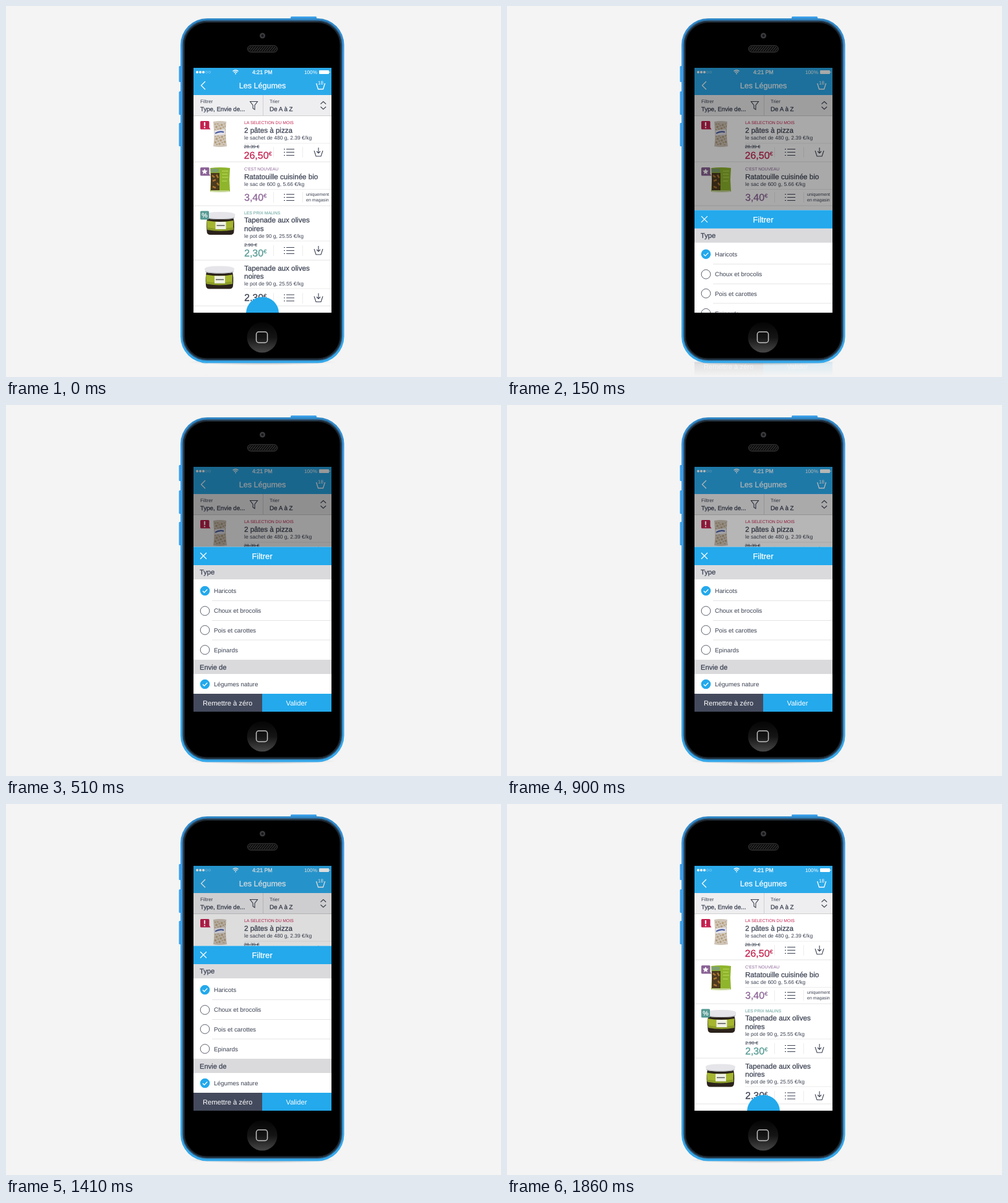
Recreate the animation shown at these times as an HTML page. Size 800 by 600 pixels, loop 2930 ms.

```html
<!DOCTYPE html>
<html lang="fr">
<head>
<meta charset="utf-8">
<title>Les Légumes</title>
<style>
html, body { margin: 0; width: 100%; height: 100%; overflow: hidden; background: #f4f4f4; }
svg { display: block; }
text { font: 10px "Liberation Sans", Arial, sans-serif; fill: currentColor; color: #3b4152; text-rendering: geometricPrecision; }
text.mid { stroke: currentColor; stroke-width: .25px; }
text.light { color: #fff; }
text.center { text-anchor: middle; }
text.tag { font-size: 6.85px; }
text.name { font-size: 11.6px; }
text.info { font-size: 8.5px; }
text.old { font-size: 7.5px; text-decoration: line-through .6px; }
text.price { font-size: 16px; }
text.price tspan { font-size: 9px; }
text.small { font-size: 7.1px; }
text.head { font-size: 11.2px; }
text.item { font-size: 9.9px; }
text.red { color: #c4214f; }
text.violet { color: #8b6396; }
text.green { color: #559a93; }
.line { fill: none; stroke: #3b4152; stroke-width: 1.1; }
.white { fill: none; stroke: #fff; stroke-width: 1.3; }
.rule { fill: none; stroke: #e4e4e6; stroke-width: 1; }

.slide { animation: slide 2930ms linear infinite; }
.fade { animation: fade 2930ms linear infinite; }
.dim { animation: dim 2930ms linear infinite; }
@keyframes slide {
  0% { transform: translateY(272px); }
  8.19%, 100% { transform: translateY(0); }
}
@keyframes fade {
  0%, 55.29% { opacity: 1; }
  63.48%, 100% { opacity: 0; }
}
@keyframes dim {
  0% { opacity: 0; }
  6.14%, 17.41% { opacity: .4; }
  63.48%, 100% { opacity: 0; }
}
</style>
</head>
<body>
<svg width="800" height="600" viewBox="0 0 800 600">
<defs>
  <clipPath id="screen"><path d="M303 100h223v396h-223z"/></clipPath>
  <linearGradient id="below" x1="0" y1="576" x2="0" y2="599" gradientUnits="userSpaceOnUse">
    <stop offset="0" stop-color="#fff" stop-opacity=".13"/>
    <stop offset="1" stop-color="#fff" stop-opacity="0"/>
  </linearGradient>
  <mask id="reflection" maskUnits="userSpaceOnUse" x="303" y="576" width="223" height="24">
    <path d="M303 576h223v24h-223z" fill="url(#below)"/>
  </mask>
  <linearGradient id="body" x1="0" x2="0" y1="0" y2="1">
    <stop offset="0" stop-color="#2f87c6"/>
    <stop offset=".1" stop-color="#3a9ae8"/>
    <stop offset="1" stop-color="#35a8ea"/>
  </linearGradient>
  <linearGradient id="button" x1="0" x2="0" y1="0" y2="1">
    <stop offset="0" stop-color="#050505"/>
    <stop offset=".5" stop-color="#141414"/>
    <stop offset="1" stop-color="#474747"/>
  </linearGradient>
  <radialGradient id="shadow">
    <stop offset="0" stop-opacity=".28"/>
    <stop offset="1" stop-opacity="0"/>
  </radialGradient>
  <pattern id="mesh" width="3" height="3" patternUnits="userSpaceOnUse" patternTransform="rotate(40)">
    <path d="M0 0h1v3h-1z" fill="#3c3c3c"/>
  </pattern>
  <pattern id="grain" width="7" height="6" patternUnits="userSpaceOnUse" patternTransform="rotate(20)">
    <path d="M0 0h3v3h-3zM4 3h2v2h-2z" fill="#a98d62"/>
  </pattern>

  <g id="list" class="line">
    <path d="M5 1h13M5 6h13M5 11h13M1 1h2M1 6h2M1 11h2"/>
  </g>
  <g id="basket" class="line">
    <path d="M1 5l3 9h8l3-9M8 0v9M5 6l3 3 3-3"/>
  </g>
  <g id="jar">
    <path d="M3 10q-2 6-1 21 0 6 6 6h32q6 0 6-6 1-15-1-21z" fill="#2b221b"/>
    <path d="M2 14q22 4 43 0l-.5 14q-20 3-42 0z" fill="#a5b52f"/>
    <path d="M2 25q20 4 43 0v4q-21 4-42 0z" fill="#8c9d28"/>
    <path d="M16 16h17v12h-17z" fill="#f1f2e6"/>
    <path d="M18 22h13" stroke="#555" stroke-width="1.5"/>
    <path d="M0 5q0-5 24-5t24 5l-1 4q-2 3-23 3t-23-3z" fill="#e6e6ea"/>
    <path d="M1 8q4 3 23 3t23-3l-1 2q-4 2-22 2t-22-2z" fill="#b4b6bc"/>
  </g>
  <g id="checked">
    <circle r="7.8" fill="#23a9ec"/>
    <path class="white" d="M-3.6 .2l2.6 2.6 4.8-5"/>
  </g>
  <circle id="unchecked" r="7.4" fill="#fff" stroke="#575c69"/>
  <path id="badge" d="M1.5 0h11.5q1.5 0 1.5 1.5v9l2 3h-15q-1.5 0-1.5-1.5v-10.500q0-1.500 1.500-1.500z"/>

  <g id="panel">
    <path d="M303 229.5h223v267h-223z" fill="#fff"/>
    <path d="M303 229.5h223v30h-223z" fill="#23a9ec"/>
    <path class="white" d="M314 239l10 10M324 239l-10 10"/>
    <text class="mid light center" x="414" y="249" style="font-size:13px">Filtrer</text>
    <path d="M303 259h223v23h-223zM303 412h223v23h-223z" fill="#dadadd"/>
    <text class="mid head" x="313" y="274">Type</text>
    <text class="mid head" x="313" y="427.5">Envie de</text>
    <path class="rule" d="M333 316.5h193M333 348.5h193M333 380h193"/>
    <use href="#checked" x="321.5" y="300.5"/>
    <use href="#unchecked" x="321.5" y="333"/>
    <use href="#unchecked" x="321.5" y="364"/>
    <use href="#unchecked" x="321.5" y="396"/>
    <use href="#checked" x="321.5" y="451.5"/>
    <text class="item" x="336" y="304">Haricots</text>
    <text class="item" x="336" y="336">Choux et brocolis</text>
    <text class="item" x="336" y="368">Pois et carottes</text>
    <text class="item" x="336" y="400">Epinards</text>
    <text class="item" x="336" y="455">Légumes nature</text>
    <path d="M303 467h111v29.5h-111z" fill="#444a5d"/>
    <path d="M414 467h112v29.5h-112z" fill="#23a9ec"/>
    <text class="light head center" x="358" y="486">Remettre à zéro</text>
    <text class="light head center" x="469.5" y="486">Valider</text>
  </g>
</defs>

<rect width="800" height="600" fill="#f4f4f4"/>
<g mask="url(#reflection)"><use href="#panel" class="slide"/></g>

<!-- phone -->
<ellipse cx="414" cy="576" rx="120" ry="5" fill="url(#shadow)"/>
<g fill="#3a9fe8">
  <rect x="460" y="17" width="42" height="6" rx="1.5"/>
  <rect x="279.5" y="97" width="5" height="26" rx="1.5"/>
  <rect x="279.5" y="138" width="5" height="38" rx="1.5"/>
  <rect x="279.5" y="189" width="5" height="38" rx="1.5"/>
</g>
<rect x="282" y="20" width="264.5" height="557.5" rx="43" fill="url(#body)"/>
<rect x="286" y="24" width="256.5" height="548.5" rx="39" fill="#000" stroke="#2d516f" stroke-width="2"/>
<rect x="288" y="26" width="252.5" height="544.5" rx="37" fill="none" stroke="#1d2730" stroke-width="2"/>
<circle cx="414.5" cy="48" r="4.5" fill="#3a3a3c"/>
<circle cx="414.5" cy="48" r="2" fill="#15161c"/>
<rect x="390.5" y="64" width="48" height="10.5" rx="5.2" fill="#0a0a0a" stroke="#444"/>
<rect x="392" y="65.5" width="45" height="7.5" rx="3.7" fill="url(#mesh)"/>
<circle cx="414" cy="536" r="24.5" fill="url(#button)"/>
<rect x="404.5" y="527" width="18" height="17.5" rx="4" fill="none" stroke="#c4c4c4" stroke-width="1.5"/>

<g clip-path="url(#screen)">
  <path d="M303 100h223v396h-223z" fill="#fff"/>

  <!-- status and title bars -->
  <path d="M303 100h223v44h-223z" fill="#2baaea"/>
  <g fill="#fff">
    <circle cx="309" cy="107" r="2"/><circle cx="314" cy="107" r="2"/><circle cx="319" cy="107" r="2"/>
    <rect x="506" y="104" width="16" height="6" rx="1"/>
    <path d="M522.5 106h1v2h-1z"/>
  </g>
  <g fill="none" stroke="#fff" stroke-width=".6" opacity=".5">
    <circle cx="324" cy="107" r="1.7"/><circle cx="329" cy="107" r="1.7"/>
  </g>
  <path class="white" d="M366.5 105.5q4.500-3.500 9 0M368.300 107.500q2.700-2 5.400 0M370 109.500h2"/>
  <text class="mid light center" x="414.3" y="110" style="font-size:8.8px">4:21 PM</text>
  <text class="light" x="482" y="110" style="font-size:8.2px">100%</text>
  <path class="white" d="M322 122l-6.500 6.500 6.500 6.500"/>
  <text class="mid light center" x="414.5" y="132.5" style="font-size:12.6px">Les Légumes</text>
  <path class="white" d="M501.5 125l3 9.500h8l3-9.500"/>
  <text class="light center" x="508.5" y="127" style="font-size:8px">18</text>

  <!-- filter bar -->
  <path d="M303 144h223v34h-223z" fill="#eeeef0"/>
  <path d="M415.5 144v34M303 177.500h223" fill="none" stroke="#cfcfd2"/>
  <text x="314" y="157" style="font-size:7.9px">Filtrer</text>
  <text class="mid" x="314" y="170" style="font-size:9.7px">Type, Envie de...</text>
  <path class="line" d="M394.5 154.500h12l-4.500 6v7l-3-2v-5z"/>
  <text x="426" y="157" style="font-size:7.8px">Trier</text>
  <text class="mid" x="426" y="170" style="font-size:9.8px">De A à Z</text>
  <path class="line" d="M508.500 158.500l4.300-4 4.300 4M508.500 163l4.300 4 4.300-4"/>

  <path class="rule" d="M303 252h223M303 323h223M303 411h223M303 485h223"/>
  <path class="rule" opacity=".7" d="M385 222h141M385 296.500h141M385 380h141M385 457h141"/>
  <path class="rule" opacity=".7" d="M432.500 228v17m0 56v17m0 69v17m0 60v17M479.500 228v17m0 56v17m0 69v17m0 60v17"/>

  <!-- pizza dough -->
  <path d="M335 187q11-2 21 0l-1 14q0 14 2 26-12 2-22 0 2-14 1-26z" fill="#cfc5b8"/>
  <path d="M337 190h18v35h-18z" fill="url(#grain)" opacity=".75"/>
  <path d="M337 201l17-2v9l-17 2z" fill="#e2e0e6"/>
  <path d="M338 206q7-4 14-2" fill="none" stroke="#3b529b" stroke-width="2"/>
  <use href="#badge" x="314" y="186" fill="#c4214f"/>
  <path d="M321 188v6M321 195.500v2" stroke="#fff" stroke-width="2.2"/>
  <text class="tag red" x="385" y="191">LA SELECTION DU MOIS</text>
  <text class="mid name" x="385" y="204.7">2 pâtes à pizza</text>
  <text class="info" x="385" y="215.5">le sachet de 480 g, 2.39 €/kg</text>
  <text class="old" x="384.5" y="230">28.39 €</text>
  <text class="mid price red" x="384.5" y="247">26,50<tspan dy="-5">€</tspan></text>
  <use href="#list" x="448" y="230.5"/>
  <use href="#basket" x="497" y="229"/>

  <!-- ratatouille -->
  <path d="M330 262q16-2 32 0l-1 19 1 19q-16 2-32 0l1-19z" fill="#8fb52c"/>
  <path d="M331 270h14v28h-14z" fill="#4d3a1f"/>
  <path d="M333 274l4 3M340 273l3 5M334 283l5-2M341 286l3 4M334 292l5 2" stroke="#a8752f" stroke-width="2.5"/>
  <path d="M331 263h13v6h-13z" fill="#7d9f6c"/>
  <path d="M349 267h10M349 272h9M349 277h10M349 283h8" stroke="#b0d050" stroke-width="1.5"/>
  <path d="M331 299.500h30" stroke="#d5dfb4" stroke-width="2"/>
  <use href="#badge" x="314" y="261" fill="#8b6396"/>
  <path d="M321 263l1.400 3.100 3.300.4-2.500 2.200.7 3.300-2.900-1.700-2.900 1.700.7-3.300-2.500-2.200 3.300-.4z" fill="#fff"/>
  <text class="tag violet" x="385" y="266">C'EST NOUVEAU</text>
  <text class="mid name" x="385" y="279.5">Ratatouille cuisinée bio</text>
  <text class="info" x="385" y="290.5">le sac de 600 g, 5.66 €/kg</text>
  <text class="mid price violet" x="385" y="315">3,40<tspan dy="-5">€</tspan></text>
  <use href="#list" x="448" y="303.5"/>
  <text class="small" x="485" y="307">uniquement</text>
  <text class="small" x="485" y="316">en magasin</text>

  <!-- tapenades -->
  <use href="#jar" x="322.5" y="333"/>
  <rect x="314" y="331.5" width="14" height="14" rx="1.5" fill="#559a93"/>
  <text class="mid light center" x="321" y="342.3" style="font-size:10.5px">%</text>
  <text class="tag green" x="385" y="337">LES PRIX MALINS</text>
  <text class="mid name" x="385" y="350.3">Tapenade aux olives</text>
  <text class="mid name" x="385" y="363.5">noires</text>
  <text class="info" x="385" y="375">le pot de 90 g, 25.55 €/kg</text>
  <text class="old" x="385" y="388.5">2.90 €</text>
  <text class="mid price green" x="385" y="405">2,30<tspan dy="-5">€</tspan></text>
  <use href="#list" x="448" y="389.5"/>
  <use href="#basket" x="497" y="388"/>

  <use href="#jar" x="321" y="420.5"/>
  <text class="mid name" x="385" y="427.5">Tapenade aux olives</text>
  <text class="mid name" x="385" y="440.7">noires</text>
  <text class="info" x="385" y="452">le pot de 90 g, 25.55 €/kg</text>
  <text class="mid price" x="385" y="476.5">2.30<tspan dy="-5">€</tspan></text>
  <use href="#list" x="448" y="466"/>
  <use href="#basket" x="497" y="464.5"/>

  <circle cx="414.5" cy="497" r="26.5" fill="#23a9ec"/>

  <path class="dim" d="M303 100h223v396h-223z"/>
  <g class="fade"><use href="#panel" class="slide"/></g>
</g>
</svg>
</body>
</html>
```
